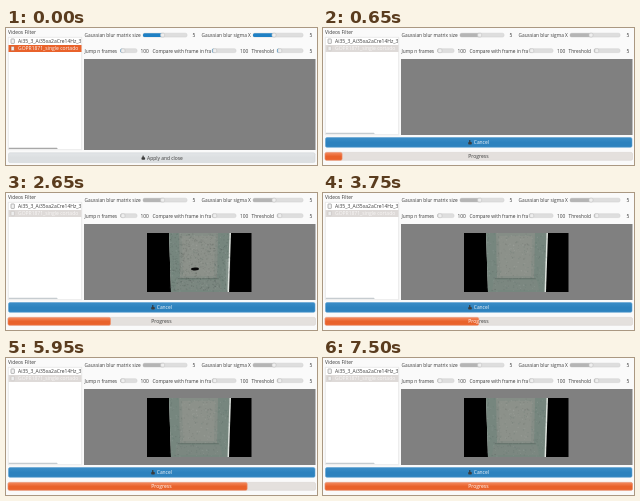
These frames come from a looping animation (311 by 137 pixels, 7.95 s). An HTML page with a canvas:

```html
<!DOCTYPE html>
<html lang="en">
<head>
<meta charset="utf-8">
<title>Video filter</title>
<style>
html, body { margin: 0; width: 100%; height: 100%; overflow: hidden; background: #fafafa; }
canvas { display: block; width: 311px; height: 137px; }
</style>
</head>
<body>
<canvas id="stage" width="311" height="137"></canvas>
<script>
const c = document.getElementById('stage').getContext('2d');
const LOOP = 7950, TICK = 50, STEPS = 18;
const INK = '#3b3b3b', ORANGE = '#e9622b', BLUE = '#2d82be';

const clamp = v => Math.max(0, Math.min(1, v));
const mix = (a, b, k) => {
  const ch = (s, i) => parseInt(s.slice(i, i + 2), 16);
  return `rgb(${[1, 3, 5].map(i => Math.round(ch(a, i) + (ch(b, i) - ch(a, i)) * k))})`;
};

// Start of step k: one about every 400 ms, with an uneven load
function stepStart(k) {
  const last = STEPS - 1;
  const drift = 110 * Math.sin(2 * Math.PI * k / last);
  const jitter = 120 * (1 - k / last) * Math.sin(Math.PI * k / 3);
  return Math.floor((600 + 400 * k - drift - jitter) / TICK) * TICK;
}

function stepAt(t) {
  let n = 0;
  while (n < STEPS && t >= stepStart(n)) n++;
  return n;
}

function rect(x, y, w, h, fill, r = 0, line) {
  c.beginPath();
  c.roundRect(x, y, w, h, r);
  c.fillStyle = fill;
  c.fill();
  if (line) {
    c.lineWidth = 0.6;
    c.strokeStyle = line;
    c.stroke();
  }
}

// Upright trapezoid whose lower edge is drawn in by `inset` on both sides
function wedge(left, right, top, bottom, inset, fill) {
  c.beginPath();
  c.moveTo(left, top);
  c.lineTo(right, top);
  c.lineTo(right - inset, bottom);
  c.lineTo(left + inset, bottom);
  c.fillStyle = fill;
  c.fill();
}

function text(s, x, y, size = 4.9, fill = INK) {
  c.font = `${size}px "Open Sans", sans-serif`;
  c.fillStyle = fill;
  c.fillText(s, x, y);
}

function clipped(x, y, w, h, draw) {
  c.save();
  c.beginPath();
  c.rect(x, y, w, h);
  c.clip();
  draw();
  c.restore();
}

function glossy(y, h, light, main) {
  const g = c.createLinearGradient(0, y, 0, y + h);
  g.addColorStop(0, light);
  g.addColorStop(0.5, main);
  g.addColorStop(1, main);
  return g;
}

function control(label, x, y, at, width, value, valueX, share, off) {
  clipped(x, y - 5, at - x - 1, 10, () => text(label, x + 0.5, y + 2, 4.8));
  const knob = share * width;
  rect(at, y - 1.9, width, 3.8, '#dedede', 1.5, '#d2d2d2');
  rect(at, y - 1.9, knob + 2, 3.8, mix('#1f80c4', '#b5b5b5', off), 1.5);
  rect(at + knob, y - 1.9, 4, 3.8, '#eeeeee', 1.2, '#c2c2c2');
  text(value, valueX, y + 2);
}

function controls(off) {
  control('Gaussian blur matrix size', 78, 7.1, 137, 44, 5, 186.5, 0.4, off);
  control('Gaussian blur sigma X', 195, 7.1, 247, 50, 5, 303.5, 0.38, off);
  control('Jump n frames', 78, 22.7, 114.5, 16.5, 100, 134.5, 0.03, off);
  control('Compare with frame in frame', 146, 22.7, 206, 24, 100, 234, 0.03, off);
  control('Threshold', 245, 22.7, 271, 26, 5, 303.5, 0.03, off);
}

function fileList(bottom, off) {
  text('Videos Filter', 2, 6.2);
  rect(2.3, 9.3, 73.4, bottom - 9.6, '#ffffff', 0, '#dcdcdc');
  clipped(2.5, 9.5, 73, bottom - 10, () => {
    rect(2, 17, 74, 7, mix(ORANGE, '#dedad8', off));
    rect(5, 11, 3.4, 4.4, '#f4f4f4', 0.5, '#888888');
    rect(5, 18.3, 3.4, 4.4, '#eeeeee', 0.5, mix('#b84a20', '#c4c0be', off));
    text('Ai35_3_Ai35xa2aCre14Hz_3', 12, 15, 5);
    text('GOPR1871_single cortado', 12, 22.3, 5, '#f8f6f5');
    rect(2.5, bottom - 2.2, 49, 1.2, mix('#a8a8a8', '#c6ccd0', off), 0.6);
  });
}

function button(label, x, y, hover, ink) {
  const base = mix('#dcdfe1', BLUE, hover);
  rect(2.5, y, 306.5, 9.8, glossy(y, 9.8, mix('#e2e5e7', '#3b8dc7', hover), base), 1.5,
    mix('#d0d4d6', '#5fa2d0', hover));
  rect(x + 1, y + 2.6, 1.2, 3, '#333333', 0.5);
  rect(x, y + 4.4, 3.6, 2.6, '#3c3c3c', 0.8);
  text(label, x + 5.6, y + 6.9, 4.9, ink);
}

function random(seed) {
  let s = seed * 7919 + 17;
  return () => (s = (s * 16807) % 2147483647) / 2147483647;
}

function dots(count, seed, colors) {
  const rnd = random(seed);
  for (let i = 0; i < count; i++) {
    const size = 0.6 + rnd() * 0.8;
    c.fillStyle = colors[Math.floor(rnd() * colors.length)];
    c.fillRect(163.5 + rnd() * 60, 40 + rnd() * 58, size, size);
  }
}

// Background estimate: speckle and the moving animal fade out as n grows
function video(n) {
  const raw = clamp(0.9 * 0.35 ** (n - 3));
  rect(141, 40, 104.5, 59, '#000000');
  clipped(141, 40, 104.5, 59, () => {
    wedge(163, 225, 40, 99, 2, '#dfe4df');
    wedge(163, 223.5, 40, 99, 2, '#76867e');
    wedge(173, 212, 40, 86, 1, '#858d86');
    wedge(176, 209, 43, 83, 1, '#8c918a');
    wedge(172, 213, 85, 86.2, 0, '#68756e');
    wedge(171, 214, 87, 97, -2, '#7b8780');
    dots(350, 3, ['#ffffff14', '#00000014', '#3b5a501c']);
    c.globalAlpha = raw;
    wedge(219.5, 224.5, 66, 99, 1, '#f2f4f2');
    dots(450, n, ['#080808', '#101414', '#2c3632', '#1c2422', '#aab4ae']);
    c.globalAlpha = clamp((8 - n) / 3);
    const w = Math.max(2, 14 - 2 * n);
    c.beginPath();
    c.ellipse(182 + 1.4 * n, 71.5 + 0.9 * n, w, w * 0.35, -0.08, 0, 7);
    c.fillStyle = '#080808';
    c.fill();
  });
}

function progress(n) {
  const y = 124.4, h = 7.9, w = 307.5 * n / STEPS;
  const title = fill => text('Progress', 145.3, 130.2, 5, fill);
  rect(2, y, 307.5, h, '#e4e0dd', 1.5, '#d8d4d1');
  title(INK);
  if (!n) return;
  rect(2, y, w, h, glossy(y, h, '#f28a60', ORANGE), 1.5, '#f0906c');
  clipped(2, y, w, h, () => title('#ffffff'));
}

function draw(t) {
  const running = t >= 250;
  const off = clamp((t - 250) / 250);
  const hover = clamp(t / 350);
  const bottom = running ? 107 : 122;
  rect(0, 0, 311, 137, '#fafafa');
  fileList(bottom, off);
  controls(off);
  rect(78, 31, 231.5, bottom - 31, '#808080');
  if (!running) return button('Apply and close', 135.5, 124.8, hover, INK);
  const shown = stepAt(t - 150);
  if (shown > 1) video(shown);
  button('Cancel', 145.2, 109.5, hover, '#f4f6f8');
  progress(stepAt(t));
}

function tick() {
  draw(Math.floor(performance.now() % LOOP / TICK) * TICK);
  requestAnimationFrame(tick);
}
tick();
</script>
</body>
</html>
```
